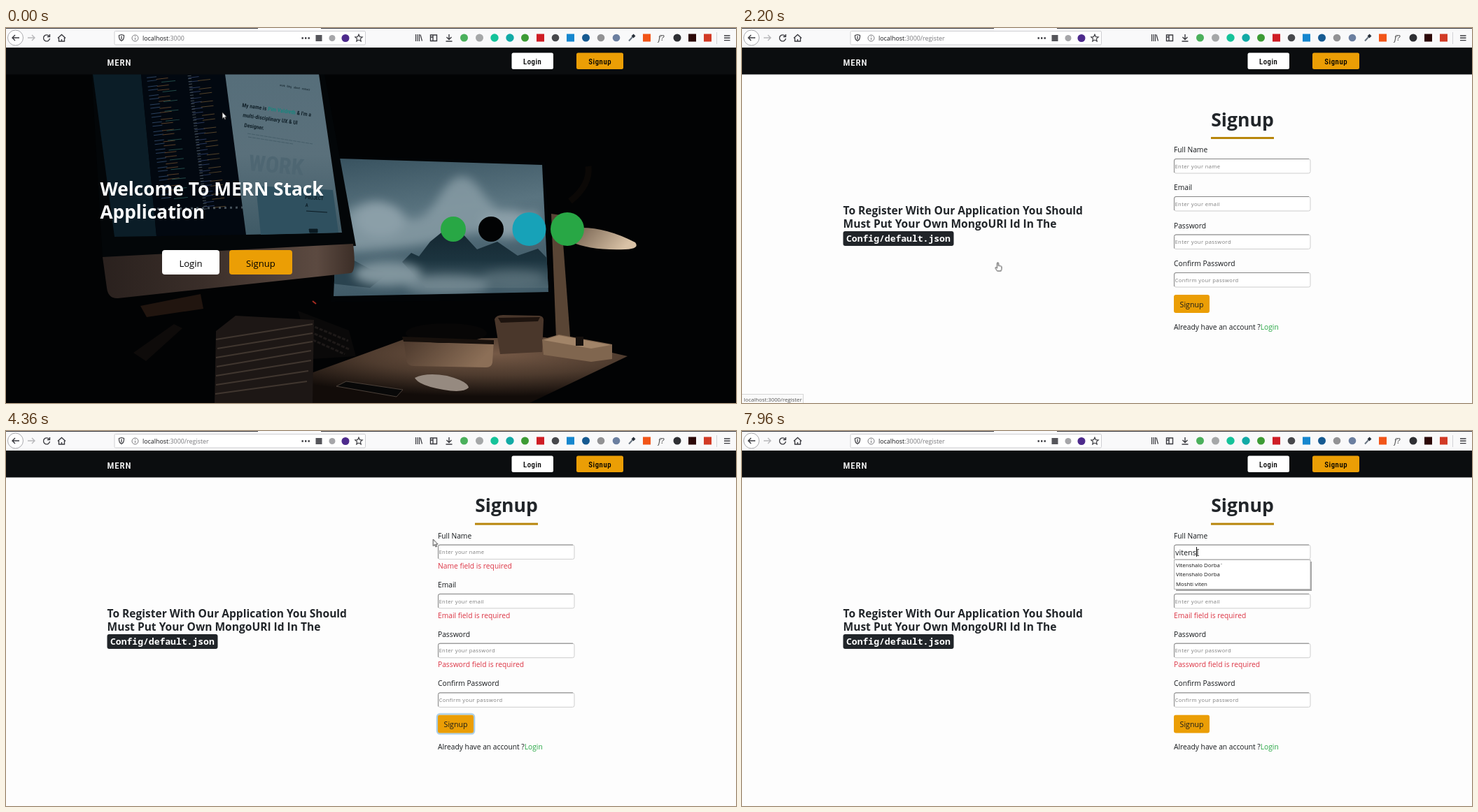
An HTML page for the animation above (8 s loop, 1043 px wide and 537 px high).

```html
<!DOCTYPE html>
<html lang="en">
<head>
<meta charset="utf-8">
<title>MERN signup demo</title>
<style>
html, body { margin: 0; width: 100%; height: 100%; overflow: hidden; background: #fdfdfd; }
svg { position: absolute; left: 0; top: 0; width: 1043px; height: 537px; }
text, .typed { font-family: "Open Sans", "Noto Sans", sans-serif; white-space: pre; }

.mid { text-anchor: middle; }
.nav text, .brand, .screen text { font-family: "Roboto Condensed", "Liberation Sans Narrow", Roboto, sans-serif; font-stretch: 75%; }
.nav { font-weight: 500; font-size: 10.8px; letter-spacing: .5px; }
.brand { font-weight: 500; font-size: 13px; letter-spacing: .9px; fill: #fff; }
.url { font-size: 8.9px; }
.hero { font-size: 26.25px; font-weight: 700; fill: #fff; }
.cta { font-size: 13.1px; }
.title { font-size: 26.6px; font-weight: 700; fill: #212529; }
.note { font-size: 15.55px; font-weight: 700; fill: #212529; }
.code { font: 700 13.05px "Noto Sans Mono", monospace; fill: #fff; }
.label { font-size: 10.25px; fill: #16191c; }
.hint { font-size: 7.6px; letter-spacing: .38px; fill: #7d7d7d; }
.error { font-size: 10.25px; fill: #dc3545; }
.option { font-size: 7.8px; fill: #111; }

/* hard switches */
.home, .register, .shift, .error, .ring-home, .hint0, .list, .list rect, .third,
.typed::before, .caret, .arrow, .hand, .beam { animation: 8s step-end infinite; }
.home { animation-name: home; }
.register { animation-name: register; }
.shift { animation-name: shift; }
.error { animation-name: error; }
.ring-home { animation-name: ring-home; }
.hint0 { animation-name: hint0; }
.list { animation-name: list; }
.list rect { animation-name: grow; }
.third { animation-name: third; }
.typed::before { content: ""; animation-name: type; }
.caret { animation-name: caret; }
.arrow { animation-name: arrow; }
.hand { animation-name: hand; }
.beam { animation-name: beam; }
/* continuous motion */
.status { animation: status 8s linear infinite; }
.ring { animation: ring 8s linear infinite; }
.cursor { animation: move 8s linear infinite; }

.typed { position: absolute; left: 619px; top: 166px; height: 15px; font-size: 10.8px; line-height: 15px; color: #16191c; }
.caret { display: inline-block; width: 1px; height: 14px; background: #111; vertical-align: top; }

@keyframes home { 0% { visibility: visible } 27.5%, 100% { visibility: hidden } }
@keyframes register { 0% { visibility: hidden } 27.5%, 100% { visibility: visible } }
@keyframes shift { 0% { transform: none } 47%, 100% { transform: translateY(var(--d)) } }
@keyframes error { 0% { visibility: hidden } 47%, 100% { visibility: visible } }
@keyframes ring-home { 0% { opacity: 0 } 25% { opacity: 1 } 27.5%, 100% { opacity: 0 } }
@keyframes hint0 { 0% { opacity: 1 } 71.25%, 100% { opacity: 0 } }
@keyframes list { 0% { visibility: hidden } 71.75%, 100% { visibility: visible } }
@keyframes grow { 0% { height: 28px } 73.75%, 100% { height: 42px } }
@keyframes third { 0% { visibility: hidden } 73.75%, 100% { visibility: visible } }
@keyframes type {
  0% { content: "" } 71.25% { content: "v" } 73.75% { content: "vi" } 75.375% { content: "vit" }
  77.5% { content: "vite" } 80.375% { content: "viten" } 99.5%, 100% { content: "vitens" }
}
@keyframes caret {
  0% { visibility: hidden } 61.625% { visibility: visible } 68.25% { visibility: hidden }
  71.25% { visibility: visible } 88.25% { visibility: hidden } 95%, 100% { visibility: visible }
}
@keyframes arrow {
  0% { visibility: visible } 18.1% { visibility: hidden } 32.5% { visibility: visible }
  39.2% { visibility: hidden } 52% { visibility: visible } 55.25%, 100% { visibility: hidden }
}
@keyframes hand {
  0% { visibility: hidden } 18.1% { visibility: visible } 32.5% { visibility: hidden }
  39.2% { visibility: visible } 52%, 100% { visibility: hidden }
}
@keyframes beam { 0% { visibility: hidden } 55.25%, 100% { visibility: visible } }
@keyframes status { 0%, 22.4% { opacity: 0 } 23.6%, 27.2% { opacity: 1 } 29.125%, 100% { opacity: 0 } }
@keyframes ring { 0%, 44.9% { opacity: 0 } 45.375%, 61.5% { opacity: 1 } 63.25%, 100% { opacity: 0 } }
@keyframes move {
  0%, 11.625% { transform: translate(309px, 120.5px) }
  13% { transform: translate(285px, 150px) }
  14.375% { transform: translate(240px, 205px) }
  15.625% { transform: translate(190px, 262px) }
  16.5% { transform: translate(165px, 300px) }
  17.5% { transform: translate(185px, 328px) }
  18.5% { transform: translate(245px, 336px) }
  19.5% { transform: translate(320px, 336px) }
  20.375%, 32.5% { transform: translate(365.5px, 335.5px) }
  33.75% { transform: translate(430px, 300px) }
  35% { transform: translate(540px, 282px) }
  36.25% { transform: translate(660px, 300px) }
  37.25% { transform: translate(733px, 345px) }
  38.25% { transform: translate(715px, 382px) }
  39.125% { transform: translate(672px, 387px) }
  40%, 52% { transform: translate(653.5px, 387px) }
  52.875% { transform: translate(625px, 300px) }
  53.625% { transform: translate(590px, 205px) }
  54% { transform: translate(584px, 175px) }
  54.5% { transform: translate(610px, 155px) }
  55.25% { transform: translate(630px, 162px) }
  57.5%, 100% { transform: translate(651px, 174px) }
}
</style>
</head>
<body>
<svg viewBox="0 0 1043 537">
  <defs>
    <linearGradient id="panel" x2="0" y2="1"><stop stop-color="#566e7a"/><stop offset=".5" stop-color="#5a707b"/><stop offset="1" stop-color="#3f5a66"/></linearGradient>
    <linearGradient id="chin" x2="1" y2="0"><stop stop-color="#2a211e"/><stop offset=".4" stop-color="#3a2e29"/><stop offset=".85" stop-color="#5c4a41"/><stop offset="1" stop-color="#3c2e27"/></linearGradient>
    <linearGradient id="sky" x2=".2" y2="1"><stop stop-color="#38525f"/><stop offset=".45" stop-color="#5a7480"/><stop offset="1" stop-color="#3f5966"/></linearGradient>
    <linearGradient id="ridge" x2="0" y2="1"><stop stop-color="#142731"/><stop offset=".5" stop-color="#1c343f"/><stop offset="1" stop-color="#4b646f"/></linearGradient>
    <radialGradient id="desk" cx=".68" cy=".25" r=".65"><stop stop-color="#755946"/><stop offset=".5" stop-color="#4e3b2e"/><stop offset="1" stop-color="#120c09"/></radialGradient>
    <linearGradient id="crate" x2="1" y2=".3"><stop stop-color="#4b382c"/><stop offset="1" stop-color="#8c6f57"/></linearGradient>
    <linearGradient id="lamp" x2="1" y2=".3"><stop stop-color="#6b5847"/><stop offset="1" stop-color="#d9c2a6"/></linearGradient>
    <filter id="soft" x="-30%" y="-30%" width="160%" height="160%"><feGaussianBlur stdDeviation="7"/></filter>
    <clipPath id="view"><path d="M477 187L766 196L775 378L468 384Z"/></clipPath>
    <clipPath id="photo"><path d="M0 66H1043V537H0Z"/></clipPath>
    <g id="field">
      <rect x="617.5" y=".5" width="194.5" height="20.5" rx="2.5" fill="#fff" stroke="#cdcdcd"/>
      <path d="M617.5 20V3Q617.5 .5 620 .5H810" fill="none" stroke="#858585"/>
    </g>
  </defs>

  <!-- landing page -->
  <g class="home">
    <rect y="66" width="1043" height="471" fill="#020304"/>
    <g clip-path="url(#photo)">
      <!-- right monitor -->
      <path d="M474 183L770 192L783 390L464 392Z" fill="#020406"/>
      <path d="M477 187L766 196L775 378L468 384Z" fill="url(#sky)"/>
      <g clip-path="url(#view)">
        <g filter="url(#soft)" fill="#8b9fa8">
          <path d="M485 265Q530 232 560 262T620 240T680 235T760 260V300Q690 285 640 300T485 320Z" opacity=".8"/>
          <ellipse cx="535" cy="275" rx="34" ry="24"/>
          <ellipse cx="715" cy="280" rx="38" ry="20"/>
        </g>
        <path d="M566 335L579 322L590 327L606 306L622 293L638 305L650 292L673 317L702 306L731 326L760 316L778 335V372H600Z" fill="url(#ridge)"/>
        <path d="M466 318L492 330L520 345L548 350L520 372L466 366Z" fill="#2a434f"/>
        <g filter="url(#soft)" fill="#80949d">
          <ellipse cx="545" cy="352" rx="48" ry="17"/>
          <ellipse cx="630" cy="368" rx="60" ry="14" opacity=".7"/>
          <ellipse cx="725" cy="358" rx="45" ry="12" opacity=".35"/>
        </g>
      </g>

      <!-- left monitor -->
      <path d="M122 60H454L500 312L138 330Z" fill="#030608"/>
      <path d="M124 66H193L215 298L155 299Z" fill="#0b1d27"/>
      <path d="M193 66H313L343 296L215 298Z" fill="#020810"/>
      <g fill="none" opacity=".55">
        <path d="M208 70L229 245" stroke="#4a6d9c" stroke-width="14" stroke-dasharray="1 4 1 7"/>
        <path d="M223 72L242 240" stroke="#a06c3b" stroke-width="17" stroke-dasharray="1 9 1 5"/>
        <path d="M232 76L250 245" stroke="#3b8076" stroke-width="20" stroke-dasharray="1 13"/>
        <path d="M268 70L291 260" stroke="#49609a" stroke-width="15" stroke-dasharray="1 5 1 8"/>
        <path d="M283 74L305 258" stroke="#94713f" stroke-width="18" stroke-dasharray="1 11 1 6"/>
        <path d="M262 68L285 260" stroke="#7a8a92" stroke-width="5" stroke-dasharray="1 3"/>
      </g>
      <path d="M216 259L338 257" stroke="#71818a" stroke-width="3" stroke-dasharray="3 5" opacity=".6"/>
      <path d="M313 66H447L480 293L343 296Z" fill="url(#panel)"/>
      <g class="screen" fill="#0b1a22">
        <g transform="translate(337 113) rotate(8)" font-size="7.8" font-weight="500">
          <text>My name is <tspan fill="#13877f">Pim Valdreth</tspan> &amp; I'm a</text>
          <text x="3" y="14">multi-disciplinary UX &amp; UI</text>
          <text x="7" y="28">Designer.</text>
        </g>
        <text transform="translate(391 83) rotate(9)" font-size="4">work   blog   about   contact</text>
        <path d="M345 151L438 166M346 156L410 166" stroke="#3d5560" stroke-dasharray="5 1" stroke-width=".7"/>
        <text transform="translate(346 204) rotate(5)" font-size="32" font-weight="700" fill="#4e6672">WORK</text>
        <path d="M357 226L467 232L475 293L364 296Z" fill="#2f505f"/>
        <text transform="translate(427 245) rotate(3)" font-size="7" font-weight="500">PROJECT<tspan x="1" dy="11">A</tspan></text>
        <path d="M429 262L459 264M433 288H445V293H434Z" stroke="#0b1a22"/>
      </g>
      <path d="M138 328L496 309Q501 350 492 351L160 387Q146 388 144 372Z" fill="url(#chin)"/>

      <!-- desk -->
      <path d="M806 248Q835 225 832 198" stroke="#0b0806" stroke-width="9" fill="none"/>
      <path d="M779 266L793 268L806 442L786 444Z" fill="#594535"/>
      <path d="M805 287Q850 281 899 307Q906 316 885 317Q835 319 807 306Z" fill="url(#lamp)"/>
      <path d="M192 398L278 381L282 402L201 414Z" fill="#21150f"/>
      <path d="M182 465L240 424L252 430L200 477Z" fill="#0e0b0a"/>
      <path d="M417 405L490 433L500 470L438 474Z" fill="#0a0909"/>
      <path d="M422 420L489 448M428 432L490 460M432 444L484 467" stroke="#1d1918" stroke-width="3" stroke-dasharray="5 2"/>
      <path d="M438 391l5 4" stroke="#a52a20" stroke-width="2"/>

      <path d="M420 500L568 446L770 443L888 470L748 537H300Z" fill="url(#desk)"/>
      <path d="M698 417Q700 411 710 411L762 412Q769 413 768 420L766 464L706 467Z" fill="#4a372b"/>
      <path d="M703 415L763 414L760 420L707 422Z" fill="#1d130e"/>
      <path d="M766 446L790 439L866 453V474L836 478L768 468Z" fill="#80664f"/>
      <path d="M768 447L790 440L864 454L836 459Z" fill="#a18468"/>
      <path d="M814 442H825V455H814Z" fill="#15100d"/>
      <path d="M568 445L697 447L695 479Q694 486 686 486L582 484Q573 483 572 476Z" fill="url(#crate)"/>
      <ellipse cx="629" cy="437" rx="58" ry="14" fill="#070606"/>
      <path d="M566 442L697 447V453L568 449Z" fill="#17100c"/>
      <path d="M584 501Q600 493 630 498Q660 506 661 515Q653 523 625 518Q590 512 584 501Z" fill="#968a80"/>
      <path d="M472 513L486 506L567 518L558 528Z" fill="#080808" stroke="#4b4039"/>
      <path d="M300 434L328 412L440 418L438 537H298Z" fill="#1d1715"/>
      <path d="M300 446L438 424M302 459L438 437M300 472L438 449M301 485L436 462M300 498L436 476M300 511L432 491M299 524L430 506" stroke="#40362f" stroke-width="2"/>
    </g>

    <text class="hero" x="134.500" y="240">Welcome To MERN Stack<tspan x="134.500" dy="33">Application</tspan></text>
    <rect x="223" y="318" width="82" height="35" rx="4" fill="#fff"/>
    <rect x="319" y="318" width="90" height="35" rx="4" fill="#eb9e05"/>
    <rect class="ring-home" x="318.500" y="317.500" width="91" height="36" rx="4.500" fill="none" stroke="#345d80" stroke-width="1.500"/>
    <g class="cta mid"><text x="264" y="341.500">Login</text><text x="364" y="341.500">Signup</text></g>
    <circle cx="639" cy="288" r="18" fill="#28a745"/>
    <circle cx="693" cy="288" r="18" fill="#020304"/>
    <circle cx="747.500" cy="288" r="24" fill="#17a2b8"/>
    <circle cx="802" cy="288" r="24" fill="#28a745"/>
  </g>

  <!-- registration page -->
  <g class="register">
    <rect y="66" width="1043" height="471" fill="#fdfdfd"/>
    <text class="note" x="144.500" y="266.500">To Register With Our Application You Should<tspan x="144.500" dy="19.700">Must Put Your Own MongoURI Id In The</tspan></text>
    <rect x="144.500" y="291" width="158" height="21" rx="3" fill="#212529"/>
    <text class="code" x="149" y="306">Config/default.json</text>

    <g class="shift" style="--d:-24.4px">
      <text class="title mid" x="715" y="140.500">Signup</text>
      <rect x="670" y="156" width="90" height="3" fill="#b8860b"/>
      <text class="label" x="617" y="178">Full Name</text>
      <use href="#field" y="187"/>
      <text class="hint hint0" x="618.500" y="200.500">Enter your name</text>
    </g>
    <g class="shift" style="--d:-8.1px">
      <text class="label" x="617" y="232.300">Email</text>
      <use href="#field" y="241"/>
      <text class="hint" x="618.500" y="254.900">Enter your email</text>
    </g>
    <g class="shift" style="--d:8.2px">
      <text class="label" x="617" y="286.700">Password</text>
      <use href="#field" y="295.500"/>
      <text class="hint" x="618.500" y="309.300">Enter your password</text>
    </g>
    <g class="shift" style="--d:24.4px">
      <text class="label" x="617" y="341">Confirm Password</text>
      <use href="#field" y="350"/>
      <text class="hint" x="618.500" y="363.700">Confirm your password</text>
      <rect class="ring" x="616" y="381" width="53" height="28" rx="4" fill="none" stroke="#a5cbe6" stroke-width="2.500"/>
      <rect x="617" y="382" width="51" height="26" rx="3" fill="#eb9e05"/>
      <text class="label mid" x="642.500" y="399.500" style="font-size:10.6px">Signup</text>
      <text class="label" x="617" y="431.700">Already have an account ?<tspan fill="#28a745">Login</tspan></text>
    </g>
    <text class="error" x="617" y="197">Name field is required</text>
    <text class="error" x="617" y="267.700">Email field is required</text>
    <text class="error" x="617" y="338.400">Password field is required</text>
    <g class="list">
      <rect x="620" y="187" width="194" height="28" fill="#a3a3a3"/>
      <rect x="617.500" y="184.500" width="194.500" height="28" fill="#fff" stroke="#b5b5b5"/>
      <g class="option">
        <text x="620" y="194.500">Vitenshalo Dorba`</text>
        <text x="620" y="208">Vitenshalo Dorba</text>
        <text class="third" x="620" y="221.500">Moshti viten</text>
      </g>
    </g>
  </g>

  <!-- site header -->
  <rect y="28" width="1043" height="38.500" fill="#0b0d0f"/>
  <text class="brand" x="144.500" y="53.500">MERN</text>
  <rect x="722.500" y="35.500" width="59.500" height="23.500" rx="2.500" fill="#fff"/>
  <rect x="815" y="35.500" width="67" height="23.500" rx="2.500" fill="#eb9e05"/>
  <g class="nav mid"><text x="752.200" y="52">Login</text><text x="848.700" y="52">Signup</text></g>

  <!-- browser toolbar -->
  <rect width="1043" height="28" fill="#f9f9fa"/>
  <path d="M0 .5H360M450 .5H1043" stroke="#37373c"/>
  <rect x="155" y="4.500" width="358.500" height="19.500" rx="1.500" fill="#fff" stroke="#cfcfd2"/>
  <g fill="none" stroke="#3b3b40" stroke-width="1.400">
    <circle cx="13.500" cy="14" r="11" fill="#fff" stroke="#a9a9ad" stroke-width="1"/>
    <path d="M19 14H9M13 10L9 14L13 18"/>
    <path d="M31 14H41M37 10L41 14L37 18" stroke="#b8b8bb"/>
    <path d="M61.500 11.500A4.500 4.500 0 1 0 62.500 15M62.500 9V12.500H59"/>
    <path d="M74 14.500L79.500 9.500L85 14.500M75.500 14V19H83.500V14M79.500 19V16"/>
    <path d="M161.500 10.500L165 9.500L168.500 10.500Q169 16.500 165 18.500Q161 16.500 161.500 10.500ZM165 11.500V16.500" stroke-width="1.200"/>
    <g stroke="#77777b" stroke-width="1"><circle cx="184.500" cy="14.500" r="4.500"/><path d="M184.500 14V17M184.500 11.500V12.700"/></g>
    <path d="M504 9.200L505.500 12.600L509.200 13L506.400 15.400L507.200 19L504 17.100L500.800 19L501.600 15.400L498.800 13L502.500 12.600Z" stroke-width="1.200"/>
    <path d="M585.500 9V19M588 9V19M590.500 9V19M592 9.500L594.500 18.500" stroke-width="1.200"/>
    <path d="M606.500 10H615.500V18.500H606.500ZM610 10V18.500M607 13H610"/>
    <path d="M633 9V16M629.500 13L633 16.500L636.500 13M628.500 19H637.500"/>
    <path d="M1026 11H1034.500M1026 14.300H1034.500M1026 17.600H1034.500"/>
    <path d="M1015.500 6V23" stroke="#d3d3d6" stroke-width="1"/>
    <path d="M890 18.500L895 13" stroke="#6a7684" stroke-width="2"/>
    <path d="M895 13L898 10" stroke="#28303a" stroke-width="4"/>
  </g>
  <path d="M422.500 14.500H434" stroke="#3b3b40" stroke-width="2.400" stroke-dasharray="2.400 2.100"/>
  <g>
    <rect x="442.500" y="10" width="9" height="9" fill="#55555a"/>
    <circle cx="466" cy="14.500" r="4.500" fill="#a6a6a9"/>
    <circle cx="485" cy="14.500" r="5.500" fill="#4d2a8c"/>
    <circle cx="654.500" cy="14" r="5.500" fill="#4bb05c"/>
    <circle cx="676.500" cy="14" r="5.500" fill="#a5a7a8"/>
    <circle cx="698" cy="14" r="5.700" fill="#15c39a"/>
    <circle cx="720" cy="14" r="5.700" fill="#12aaa6"/>
    <circle cx="741.500" cy="14" r="5.500" fill="#3d9b35"/>
    <rect x="758" y="8.500" width="11" height="11" fill="#cf1d25"/>
    <circle cx="785" cy="14" r="5.300" fill="#47484c"/>
    <rect x="801" y="8.500" width="11" height="11" fill="#1687cf"/>
    <circle cx="828.500" cy="14" r="5.500" fill="#165a91"/>
    <circle cx="850" cy="14" r="5.300" fill="#929294"/>
    <circle cx="872" cy="14" r="5.300" fill="#6b7fa0"/>
    <rect x="910" y="8.500" width="11" height="11" fill="#f25518"/>
    <circle cx="959" cy="14" r="5.500" fill="#2e2f33"/>
    <rect x="975" y="8.500" width="11" height="11" fill="#2c0808"/>
    <rect x="997" y="8.500" width="11" height="11" fill="#d23a25"/>
  </g>
  <text x="932" y="17.500" font-size="10" font-style="italic" fill="#333" style="font-family:'Noto Serif',serif">f?</text>
  <text class="url" x="195" y="18" fill="#18181b">localhost<tspan fill="#77777b">:3000<tspan class="register">/register</tspan></tspan></text>

  <g class="status">
    <rect x="-1" y="524.500" width="88.500" height="14" fill="#fafafa" stroke="#cfcfcf"/>
    <text x="2.500" y="535" font-size="7.800" fill="#333">localhost:3000/register</text>
  </g>
</svg>

<div class="typed"><i class="caret"></i></div>

<svg viewBox="0 0 1043 537">
  <g class="cursor" stroke="#151515" stroke-width=".8" stroke-linejoin="round" fill="#fff">
    <path class="arrow" d="M0 0V9.500L2.200 7.500L3.700 10.800L5.200 10.100L3.700 7H6.600Z"/>
    <path class="hand" d="M-1 1Q0 -.3 1 1V5Q2 4.200 2.700 5.300Q3.800 4.600 4.300 5.700Q5.500 5.400 5.500 6.800V9.500L4.500 12.500H-.8L-3.600 8.300Q-3.400 6.700 -2 7.500L-1 8.500Z"/>
    <path class="beam" d="M-2 -4.500H-.6L0 -4L.6 -4.500H2M0 -4V4M-2 4.500H-.6L0 4L.6 4.500H2" fill="none"/>
  </g>
</svg>
</body>
</html>
```
